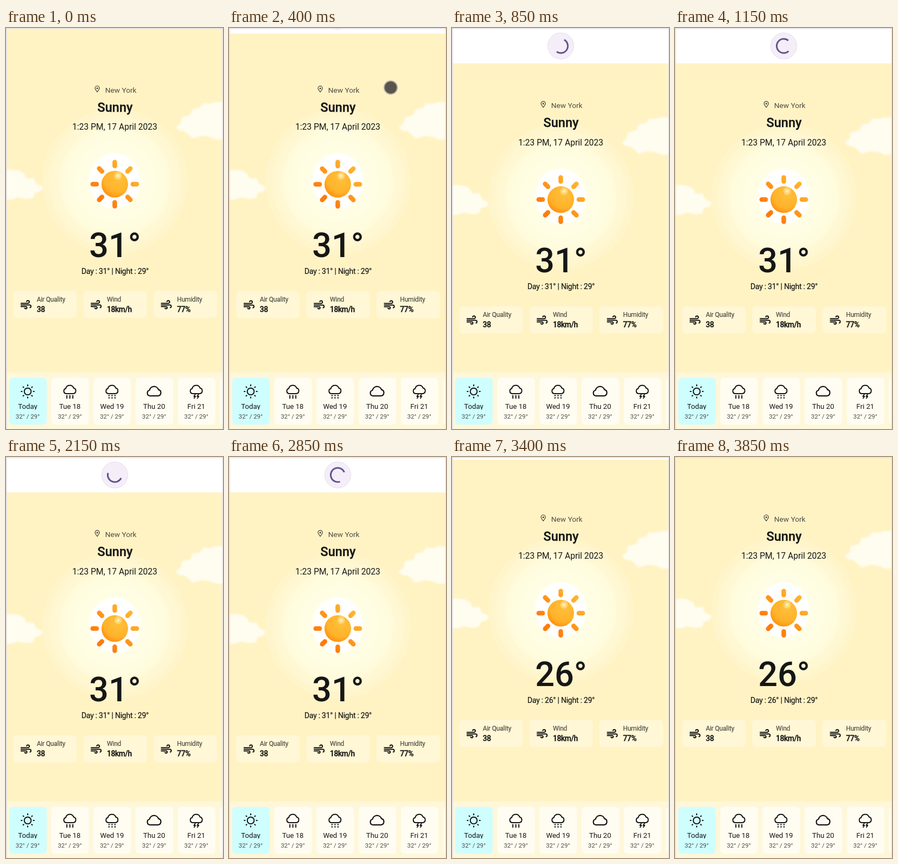
These frames come from a looping animation (400 by 737 pixels, 3.9 s). An HTML page:

```html
<!DOCTYPE html>
<html lang="en">
<head>
<meta charset="utf-8">
<title>Pull to refresh weather</title>
<style>
  html, body { margin: 0; width: 100%; height: 100%; overflow: hidden; background: #fff; }
  svg { display: block; font-family: Roboto, sans-serif; fill: #161616; }
  .mid { text-anchor: middle; }
  .soft { fill: #4e4c47; }
  .strong { font-weight: 500; stroke: #161616; stroke-width: .35; }
  .line { fill: none; stroke: #161616; stroke-width: 2; stroke-linecap: round; stroke-linejoin: round; }
</style>
</head>
<body>
<svg width="400" height="737" viewBox="0 0 400 737">
  <defs>
    <radialGradient id="glow">
      <stop offset="0" stop-color="#ffffea"/>
      <stop offset=".45" stop-color="#fffee4"/>
      <stop offset=".72" stop-color="#fffcdd"/>
      <stop offset=".78" stop-color="#fff8d4"/>
      <stop offset=".88" stop-color="#fff7d1"/>
      <stop offset=".92" stop-color="#fff5cc"/>
      <stop offset=".98" stop-color="#fff5cb"/>
      <stop offset="1" stop-color="#fff5cb" stop-opacity="0"/>
    </radialGradient>
    <radialGradient id="ball" cx=".62" cy=".3" r=".8">
      <stop offset="0" stop-color="#ffc03c"/>
      <stop offset=".65" stop-color="#ffb229"/>
      <stop offset="1" stop-color="#ff8508"/>
    </radialGradient>
    <linearGradient id="rays" gradientUnits="userSpaceOnUse" x1="30" y1="-30" x2="-25" y2="25">
      <stop offset="0" stop-color="#ffb42e"/>
      <stop offset="1" stop-color="#ff7b0c"/>
    </linearGradient>
    <radialGradient id="touch">
      <stop offset=".74" stop-color="#59544c"/>
      <stop offset=".83" stop-color="#a3a098"/>
      <stop offset=".9" stop-color="#c4c0b0"/>
      <stop offset="1" stop-color="#d8d2b8" stop-opacity="0"/>
    </radialGradient>
    <filter id="blur"><feGaussianBlur stdDeviation="1.5"/></filter>
    <clipPath id="labels"><path d="M0 640H400V701.5H0Z"/></clipPath>
  </defs>

  <rect id="sky" width="400" fill="#fff3c4"/>
  <g id="content">
    <g fill="#fffdf0" filter="url(#blur)">
      <path d="M410 136H385Q374 141 364 138L357 147L344 149L340 160L324 164L322 175L313 182Q318 190 328 189L336 195L344 203L361 198L376 200L388 205L410 203Z"/>
      <path d="M-10 262Q10 259 24 262L34 268L37 276L51 276L55 286L68 292L64 300L53 303L50 312L38 314L22 311L10 315H-10Z"/>
    </g>
    <circle cx="201" cy="282" r="135" fill="url(#glow)"/>
    <ellipse cx="200.500" cy="281" rx="47" ry="51" fill="#fff" filter="url(#blur)"/>
    <g id="sun" transform="translate(200.5 287)">
      <circle r="24.500" fill="url(#ball)"/>
      <circle cx="6" cy="-15.500" r="7" fill="#ffe08c" opacity=".7"/>
      <circle cx="6" cy="-15.500" r="3" fill="#fff0bd" opacity=".8"/>
    </g>
    <path class="line" style="stroke:#3d3b36;stroke-width:1.2" d="M168.200 117.500Q164.200 112.800 164.200 110.500A4 4 0 0 1 172.200 110.500Q172.200 112.800 168.200 117.500Z"/>
    <circle cx="168.200" cy="110.700" r="1.500" fill="#3d3b36"/>
    <text class="soft" x="182.700" y="118.700" font-size="13.700">New York</text>
    <text class="mid strong" x="201" y="154" font-size="23.500">Sunny</text>
    <text class="mid" x="200.500" y="187.300" font-size="15.600">1:23 PM, 17 April 2023</text>
    <text id="temp" class="mid" x="201" y="421" font-size="63" font-weight="500"></text>
    <text id="range" class="mid" x="201" y="452" font-size="14" letter-spacing="-.25" stroke="#161616" stroke-width=".2"></text>
    <g id="facts"></g>
  </g>

  <rect y="633" width="400" height="104" fill="#fff7da"/>
  <g id="days"></g>

  <g id="spinner">
    <circle r="24" fill="#f5eef8" stroke="#e6dde8"/>
    <path id="arc" fill="none" stroke-width="3"/>
  </g>
  <circle id="finger" r="14" fill="url(#touch)"/>
  <path d="M1 0V737M0 1H400M399.500 0V737" fill="none" stroke="#e2e0e5" stroke-width="1.500"/>
</svg>
<script>
const LOOP = 3900, RELEASE = 680, LOADED = 3060, SPEED = 1.465;
const $ = id => document.getElementById(id);
const add = (id, markup) => $(id).insertAdjacentHTML('beforeend', markup);
const turns = n => [...Array(n).keys()].map(i => i * 360 / n);

const cloud = 'M-7 5a4.700 4.700 0 0 1-.6-9.200a7.600 7.600 0 0 1 14.600-1a5.200 5.200 0 0 1-.6 10.200z';
const wind = 'M27 506H40.500A2.500 2.500 0 1 0 38 503.500M27 509H43.500A2.500 2.500 0 0 1 43.500 514M27 512H36.500A2 2 0 1 1 34.500 514';
const smallCloud = `<path d="${cloud}" transform="translate(0 -1)"/>`;
const icons = [
  '<circle r="6.300"/>' + turns(8).map(a => `<path d="M0-10.500V-11.800" transform="rotate(${a})" stroke-width="2.200"/>`).join(''),
  smallCloud + '<path d="M-5.500 7.500V12.500M0 7.500V12.500M5.500 7.500V12.500"/>',
  smallCloud + '<path d="M-5.500 7.500h.1M0 7.500h.1M5.500 7.500h.1M-5.500 11.700h.1M0 11.700h.1M5.500 11.700h.1" stroke-width="2.500"/>',
  `<path d="${cloud}" transform="translate(0 2.500) scale(1.130)"/>`,
  smallCloud + '<path d="M-2 5.500L-4.500 9H-1.500L-4 12.500M4 5.500L1.500 9H4.500L2 12.500" stroke-width="1.800"/>',
];

turns(8).forEach(a => {
  const x = 37 * Math.sin(a * Math.PI / 180), y = -37 * Math.cos(a * Math.PI / 180), k = 3.6 / 37;
  add('sun', `<path d="M${x * (1 - k)} ${y * (1 - k)}L${x * (1 + k)} ${y * (1 + k)}" stroke="url(#rays)" stroke-width="8.500" stroke-linecap="round"/>`);
});

[['Air Quality', '38'], ['Wind', '18km/h'], ['Humidity', '77%']].forEach(([name, value], i) =>
  add('facts', `<g transform="translate(${i * 129.3})">
    <rect x="13" y="483" width="117.500" height="50" rx="7" fill="#fff7d5"/>
    <path class="line" style="stroke-linecap:butt" d="${wind}"/>
    <text class="soft" x="56.700" y="502.800" font-size="12" letter-spacing="-.2" stroke="#4e4c47" stroke-width=".2">${name}</text>
    <text class="strong" x="56.700" y="522" font-size="13.800" letter-spacing="-.35">${value}</text></g>`));

['Today', 'Tue 18', 'Wed 19', 'Thu 20', 'Fri 21', ''].forEach((day, i) => {
  const x = 40 + 77.7 * i;
  add('days', `<rect x="${x - 34}" y="643" width="69" height="86" rx="7" fill="${i ? '#fffdf2' : '#cffeff'}"/>`);
  if (day) add('days', `<g class="line" transform="translate(${x} 668)">${icons[i]}</g>
    <g clip-path="url(#labels)"><text class="mid" x="${x}" y="700" font-size="13.200">${day}</text></g>
    <text class="mid soft" x="${x}" y="717.500" font-size="11.400">32° / 29°</text>`);
});

// Piecewise linear value through [time, value] points
function along(points, t) {
  const i = points.findIndex(p => p[0] > t);
  if (i < 0) return points[points.length - 1][1];
  if (!i) return points[0][1];
  const [t0, a] = points[i - 1], [t1, b] = points[i];
  return a + (b - a) * (t - t0) / (t1 - t0);
}

// cubic-bezier(.4, 0, .2, 1)
function ease(x) {
  if (x <= 0 || x >= 1) return x <= 0 ? 0 : 1;
  let lo = 0, hi = 1, s;
  for (let i = 0; i < 20; i++) {
    s = (lo + hi) / 2;
    if (1.2 * s * (1 - s) ** 2 + .6 * s * s * (1 - s) + s ** 3 < x) lo = s; else hi = s;
  }
  return 3 * s * s - 2 * s ** 3;
}

function pullHeight(t) {
  if (t < RELEASE) return along([[365, 0], [400, 10], [600, 82], [RELEASE, 84]], t);
  if (t < 3200) return 84 - 19 * ease((t - RELEASE) / 170);
  const p = Math.min(1, (t - 3200) / 250);
  return 65 * (p < .5 ? 1 - 2 * p * p : 2 * (1 - p) ** 2);
}

function arcPath(start, sweep) {
  const point = a => `${13 * Math.cos(a)} ${13 * Math.sin(a)}`;
  return `M${point(start)}A13 13 0 ${sweep > Math.PI ? 1 : 0} 1 ${point(start + sweep)}`;
}

function drawSpinner(t, h) {
  const scale = Math.max(0, Math.min(1, 1 - (t - LOADED) / 130));
  const shown = h > 10 && scale > 0;
  $('spinner').style.display = shown ? '' : 'none';
  if (!shown) return;
  $('spinner').setAttribute('transform', `translate(200.5 ${h - 32}) scale(${scale})`);
  let start = -Math.PI / 2, sweep = h / 195 * 2 * Math.PI;
  if (t >= RELEASE) {
    const ms = (t - 1150) * SPEED, cycle = .55 + ms / 1333;
    const phase = cycle - Math.floor(cycle);
    const head = ease(phase * 2), tail = ease(phase * 2 - 1);
    start += Math.PI * (1.5 * tail + .5 * phase + 2 * (.222 + ms / 2222));
    sweep = Math.max(.02, 1.5 * Math.PI * (head - tail));
  }
  $('arc').setAttribute('d', arcPath(start, sweep));
  $('arc').setAttribute('stroke', t < RELEASE ? '#77717b' : '#5f568d');
}

function draw(t) {
  const h = pullHeight(t), degrees = t < LOADED ? 31 : 26;
  $('sky').setAttribute('y', h);
  $('sky').setAttribute('height', 633 - h);
  $('content').setAttribute('transform', `translate(0 ${Math.max(0, .515 * (h - 10))})`);
  $('temp').textContent = degrees + '°';
  $('range').textContent = `Day : ${degrees}° | Night : 29°`;
  drawSpinner(t, h);
  $('finger').style.display = t >= 250 && t < RELEASE ? '' : 'none';
  $('finger').setAttribute('cx', along([[300, 297], [400, 298], [600, 305.5]], t));
  $('finger').setAttribute('cy', along([[300, 96], [400, 109], [600, 189], [RELEASE, 192]], t));
}

const begin = performance.now();
(function tick() {
  draw((performance.now() - begin) % LOOP);
  requestAnimationFrame(tick);
})();
</script>
</body>
</html>
```
